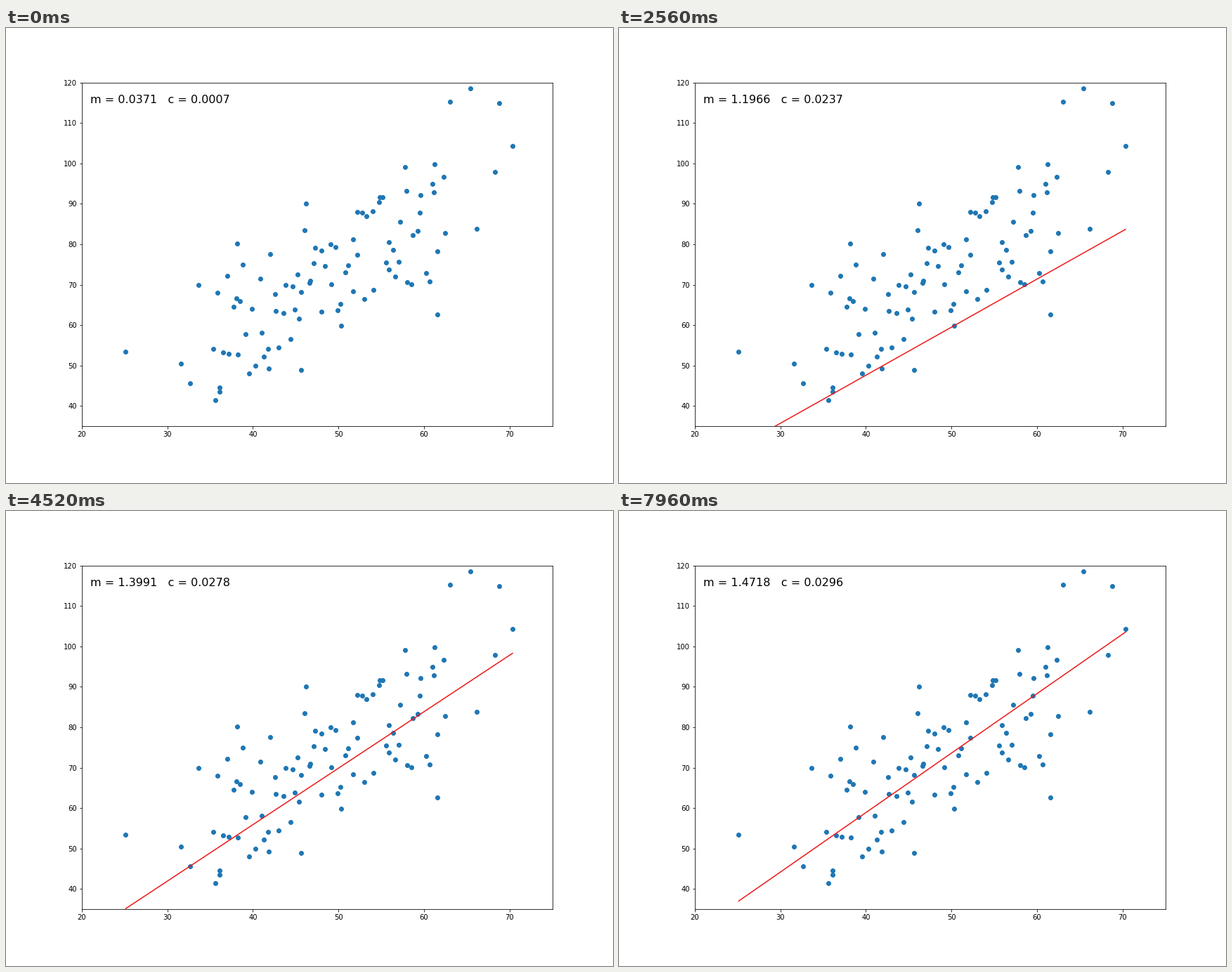
A matplotlib script that plays this animation: 864 by 648 pixels, repeating every 8000 ms.

```python
import numpy as np
import matplotlib.pyplot as plt
from matplotlib.animation import FuncAnimation

FRAMES, INTERVAL = 200, 40
RATE = 5e-6

# Moments of the whole point set; the descent depends on nothing else.
COUNT = 99
MEAN = np.array([49.1246, 73.1495])
COV = np.array([[92.22, 118.72], [118.72, 260.3]])

# Points that shape the rim of the cloud.
RIM = np.array([
    (25.13, 53.45), (31.59, 50.39), (32.67, 45.57), (35.57, 41.41),
    (45.62, 48.85), (61.53, 62.56), (66.19, 83.88), (70.35, 104.26),
    (68.77, 114.85), (65.42, 118.59), (63.00, 115.24), (57.79, 99.05),
    (46.23, 90.12), (38.12, 80.17), (33.64, 69.90), (68.32, 97.92)])


def scatter_points():
    """Rim points plus a seeded cloud that completes the moments."""
    rng = np.random.default_rng(7)
    n = COUNT - len(RIM)
    mean = (COUNT * MEAN - RIM.sum(axis=0)) / n
    second = COUNT * (COV + np.outer(MEAN, MEAN)) - RIM.T @ RIM
    cov = second / n - np.outer(mean, mean)

    ramp = np.linspace(-1, 1, n)
    cloud = np.array([ramp + rng.uniform(-0.02, 0.02, n),
                      rng.permutation(ramp)])
    cloud -= cloud.mean(axis=1, keepdims=True)
    white = np.linalg.solve(np.linalg.cholesky(np.cov(cloud, ddof=0)), cloud)
    fill = mean + (np.linalg.cholesky(cov) @ white).T
    return np.vstack([RIM, fill]).T


def descend(x, y, steps):
    """Slope and intercept before and after each gradient step."""
    m = c = 0.0
    history = [(m, c)]
    for _ in range(steps):
        error = y - (m * x + c)
        m += RATE * 2 * np.mean(x * error)
        c += RATE * 2 * np.mean(error)
        history.append((m, c))
    return history


x, y = scatter_points()
ends = np.array([x.min(), x.max()])
fits = descend(x, y, FRAMES)

fig, ax = plt.subplots(figsize=(12, 9), dpi=72)
fig.subplots_adjust(left=0.125, right=0.9, bottom=0.125, top=0.88)
ax.set(xlim=(20, 75), ylim=(35, 120))
ax.scatter(x, y)
line, = ax.plot([], [], color="#ec1616")
label = ax.text(21, 115, "", fontsize=16)


def update(i):
    # The line shows the fit before the step, the label the one after it.
    m, c = fits[i]
    line.set_data(ends, m * ends + c)
    m, c = fits[i + 1]
    label.set_text(f"m = {m:.4f}   c = {c:.4f}")
    return line, label


anim = FuncAnimation(fig, update, frames=FRAMES, interval=INTERVAL,
                     repeat=True, repeat_delay=0)
plt.show()
```
